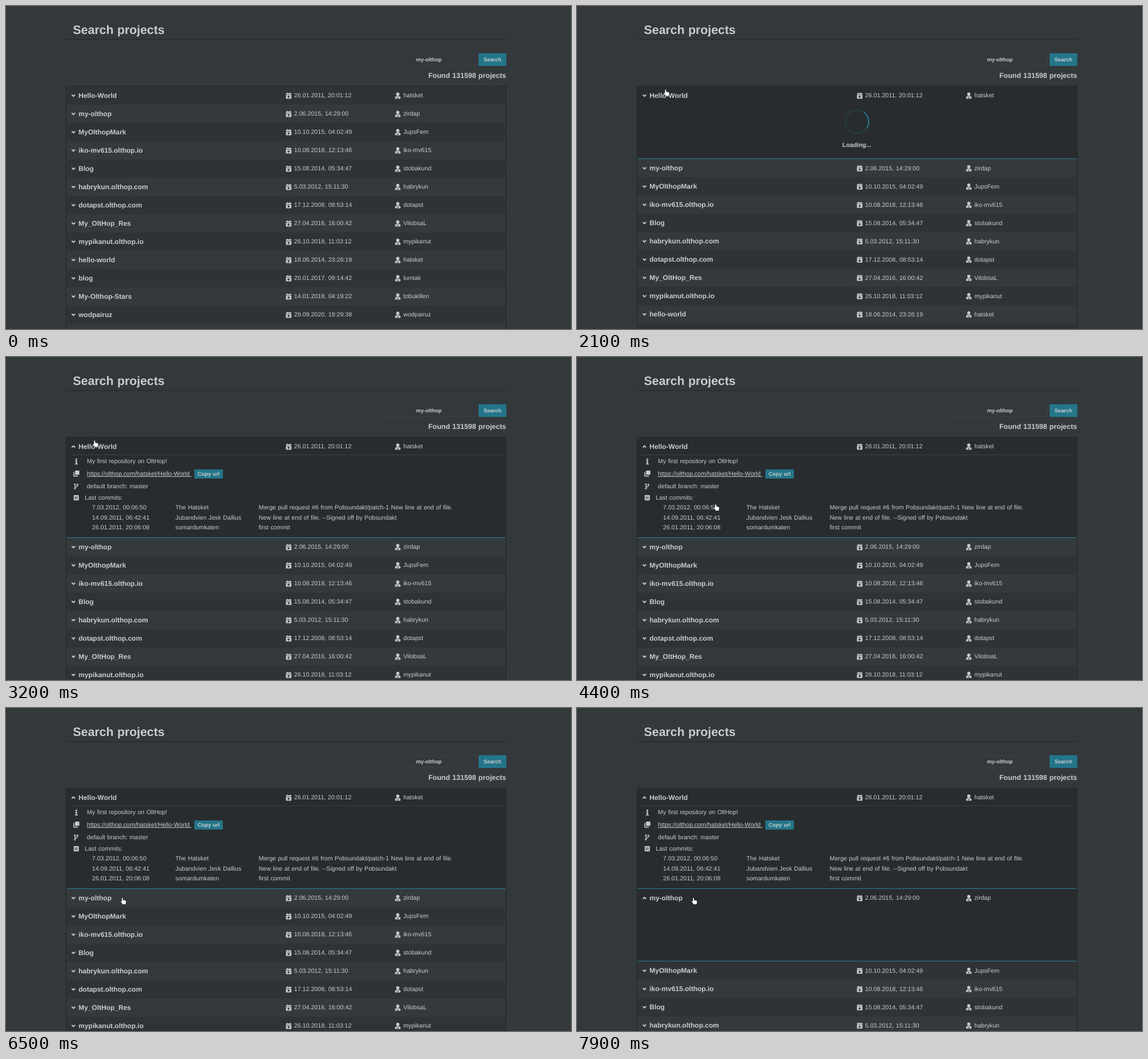
Recreate the animation shown at these times as an HTML page with a canvas. Size 990 by 566 pixels, loop 8 s.

```html
<!DOCTYPE html>
<html lang="en">
<head>
<meta charset="utf-8">
<title>Search projects</title>
<style>
html, body { margin: 0; width: 100%; height: 100%; overflow: hidden; background: #33383b; }
canvas { display: block; }
</style>
</head>
<body>
<canvas id="stage" width="990" height="566"></canvas>
<script>
const ctx = document.getElementById('stage').getContext('2d');
const LOOP = 8000, STEP = 100;
const FAMILY = '"Liberation Sans", Arial, sans-serif';
const C = {
  page: '#33383b', odd: '#2f3336', even: '#34393c', open: '#282c2e',
  edge: '#272b2d', text: '#c9cccd', teal: '#24758a', rule: '#3c4245', field: '#3a3f43'
};

// name | created | owner
const projects = `Hello-World|26.01.2011, 20:01:12|hatsket
my-olthop|2.06.2015, 14:29:00|zirdap
MyOlthopMark|10.10.2015, 04:02:49|JupsFem
iko-mv615.olthop.io|10.08.2018, 12:13:46|iko-mv615
Blog|15.08.2014, 05:34:47|stobakund
habrykun.olthop.com|5.03.2012, 15:11:30|habrykun
dotapst.olthop.com|17.12.2008, 08:53:14|dotapst
My_OltHop_Res|27.04.2016, 16:00:42|VilobsaL
mypikanut.olthop.io|26.10.2018, 11:03:12|mypikanut
hello-world|18.06.2014, 23:26:19|hatsket
blog|20.01.2017, 09:14:42|lumiak
My-Olthop-Stars|14.01.2018, 04:19:22|tobukillen
wodpairuz|29.09.2020, 19:29:38|wodpairuz
||`.split('\n').map(line => line.split('|'));

const commits = [
  ['7.03.2012, 00:06:50', 'The Hatsket', 'Merge pull request #6 from Pobsundakt/patch-1 New line at end of file.'],
  ['14.09.2011, 06:42:41', 'Jubandvien Jesk Dallius', 'New line at end of file. --Signed off by Pobsundakt'],
  ['26.01.2011, 20:06:08', 'somardumkaten', 'first commit']
];

// pointer path: time, left, top
const path = [
  [900, 857, 40], [1100, 768, 157], [1200, 768, 157], [1400, 182.8, 195],
  [1500, 152, 89], [1700, 152, 146], [3700, 152, 146], [3900, 342.5, 280.5],
  [4000, 342.5, 280.5], [4100, 342, 304.5], [4200, 342, 304.5], [4400, 239.6, 257.7],
  [4500, 239.6, 257.7], [4700, 120, 275], [4800, 330, 308], [4900, 552, 285],
  [5000, 552, 285], [5200, 803, 141], [5500, 108, 230], [5700, 180, 312],
  [5900, 221, 324], [6100, 219, 382], [6300, 203, 348], [6500, 200.8, 332.5]
];

const openFirst = 1800, fadeFirst = 2700, detailAt = 3200;
const openSecond = 6700, fadeSecond = 7415, fadeTime = 500;

const clamp = v => Math.max(0, Math.min(1, v));

function text(s, x, y, size = 10.667, bold = false, align = 'left') {
  ctx.font = `${bold ? 'bold ' : ''}${size}px ${FAMILY}`;
  ctx.textAlign = align;
  ctx.fillStyle = C.text;
  ctx.fillText(s, x, y + size * 0.3465);
}

function rect(x, y, w, h, color, r = 0) {
  ctx.fillStyle = color;
  ctx.beginPath();
  ctx.roundRect(x, y, w, h, r);
  ctx.fill();
}

function line(points, color, width) {
  ctx.strokeStyle = color;
  ctx.lineWidth = width;
  ctx.beginPath();
  points.forEach(([x, y]) => ctx.lineTo(x, y));
  ctx.stroke();
}

function disc(x, y, r, color = C.text) {
  ctx.fillStyle = color;
  ctx.beginPath();
  ctx.arc(x, y, r, 0, 7);
  ctx.fill();
}

function at(x, y, draw) {
  ctx.save();
  ctx.translate(x, y);
  draw();
  ctx.restore();
}

function chevron(y, up) {
  const d = up ? -1.6 : 1.6;
  line([[115.3, y - d], [118.2, y + d * 0.8], [121.1, y - d]], C.text, 1.9);
}

function calendar(bg) {
  rect(1.9, 0, 1.4, 2.5, C.text, 0.4);
  rect(6.3, 0, 1.4, 2.5, C.text, 0.4);
  rect(0, 1.4, 9.6, 2.1, C.text, [1, 1, 0, 0]);
  rect(0, 4.1, 9.6, 6.8, C.text, [0, 0, 1, 1]);
  rect(2.6, 6.8, 4.4, 1.4, bg);
  rect(4.1, 5.3, 1.4, 4.4, bg);
}

function person(bg) {
  disc(4.8, 2.8, 2.8);
  ctx.fill(new Path2D('M0 10V9Q.2 6.3 2.8 5.9H6.8Q9.4 6.3 9.6 9V10Q9.6 10.9 8.6 10.9H1Q0 10.9 0 10Z'));
  line([[3, 6.6], [4, 10.4], [4.5, 8]], bg, 0.5);
  line([[6.6, 6.6], [5.6, 10.4], [5.1, 8]], bg, 0.5);
}

function infoIcon() {
  disc(3, 1.5, 1.5);
  rect(1, 4, 3.2, 1.5, C.text);
  rect(2.1, 4, 2.1, 6, C.text);
  rect(0.6, 9, 5, 1.6, C.text);
}

function copyIcon() {
  rect(3, 0, 7.5, 7.6, C.text, 0.9);
  line([[0.8, 2.6], [0.8, 9.7], [8, 9.7]], C.text, 1.6);
}

function branchIcon() {
  line([[1.8, 2], [1.8, 9]], C.text, 1.3);
  line([[1.8, 6.6], [5.4, 5.8], [6.2, 3]], C.text, 1.3);
  for (const [x, y] of [[1.8, 1.8], [1.8, 9], [6.3, 2.4]]) {
    disc(x, y, 1.7);
    disc(x, y, 0.6, C.open);
  }
}

function commitIcon() {
  rect(0, 0, 9, 9.2, C.text, 1);
  rect(2, 2.2, 1.2, 4.8, C.open);
  for (let i = 0; i < 3; i++) rect(4.2, 2.2 + i * 1.8, 2.6, 0.9, C.open);
}

function loader(top, angle, alpha) {
  const x = 490.7, y = top + 61.8, a = angle * Math.PI / 180;
  ctx.save();
  ctx.globalAlpha = alpha;
  ctx.lineWidth = 2;
  ctx.strokeStyle = 'rgba(36,117,138,.25)';
  ctx.beginPath();
  ctx.arc(x, y, 20.5, 0, 7);
  ctx.stroke();
  ctx.strokeStyle = '#287d93';
  ctx.beginPath();
  ctx.arc(x, y, 20.5, a - Math.PI / 4, a + Math.PI / 4);
  ctx.stroke();
  text('Loading...', 490.2, top + 102, 10.667, true, 'center');
  ctx.restore();
}

function details(top) {
  rect(112, top + 30, 758, 1, C.rule);
  at(120.2, top + 36.7, infoIcon);
  text('My first repository on OltHop!', 141.8, top + 41.3);
  at(118, top + 58, copyIcon);
  text('https://olthop.com/hatsket/Hello-World', 141.8, top + 63.3);
  rect(141.8, top + 68, 183, 1, C.text);
  rect(330, top + 56, 50, 16, C.teal, 1);
  text('Copy url', 355, top + 63.6, 9.333, true, 'center');
  at(119, top + 80.4, branchIcon);
  text('default branch: master', 141.8, top + 85.3);
  at(118.6, top + 101, commitIcon);
  text('Last commits:', 138, top + 105.7);
  commits.forEach((row, i) => row.forEach((s, k) => text(s, 150.8 + k * 146, top + 122.6 + i * 17.35)));
}

function header() {
  text('Search projects', 117.3, 41.6, 21.333, true);
  rect(105, 58, 772, 1.2, C.edge);
  ctx.strokeStyle = C.field;
  ctx.lineWidth = 1;
  ctx.strokeRect(657.5, 83.5, 166, 21);
  text('my-olthop', 741, 94, 9.333, true, 'center');
  rect(828, 82.7, 48.7, 22.2, C.teal, 1);
  text('Search', 852.3, 94, 9.333, true, 'center');
  text('Found 131598 projects', 876.3, 121.7, 12.48, true, 'right');
}

function panel(i, t) {
  if (i === 0 && t >= openFirst) {
    return {
      detail: t >= detailAt, up: t >= fadeFirst,
      angle: -10 + 0.45 * (t - 2100), alpha: 1 - clamp((t - fadeFirst) / fadeTime)
    };
  }
  if (i === 1 && t >= openSecond) {
    return {
      up: t >= fadeSecond,
      angle: 148 + 0.45 * (t - 7900), alpha: 1 - clamp((t - fadeSecond) / fadeTime)
    };
  }
  return null;
}

function list(t) {
  rect(104.7, 139.7, 772.2, 440, C.edge);
  let top = 141;
  projects.forEach(([name, date, owner], i) => {
    const p = panel(i, t);
    const h = !p ? 32 : p.detail ? 176 : 127.3;
    const bg = p ? C.open : i % 2 ? C.even : C.odd;
    rect(106, top, 769.6, h, bg);
    if (name) {
      chevron(top + 16, p && p.up);
      text(name, 127, top + 16, 12, true);
      at(490.5, top + 10.6, () => calendar(bg));
      text(date, 504.8, top + 15.8);
      at(681.7, top + 10.6, () => person(bg));
      text(owner, 696.2, top + 15.8);
    }
    if (p) {
      if (p.detail) details(top);
      else loader(top, p.angle, p.alpha);
      rect(106, Math.round(top + h - 1), 769.6, 1, '#2b7f96');
    }
    top += h;
  });
}

const hand = new Path2D('M2.3 1Q3.2-.3 4.1 1V4.6Q5 4 6 4.6Q7 4.3 7.6 5Q9 4.8 9.4 6V8Q9.2 10 8.4 11.5H3.6Q2.8 9.8.6 7.6Q-.2 6.2 1.2 6.1L2.3 7Z');
const arrow = new Path2D('M.5.5V10.6L2.9 8.4L4.5 12L6.2 11.2L4.6 7.8H7.8Z');

function pointer(t) {
  if (t < path[0][0]) return;
  let k = path.findIndex(p => p[0] > t);
  if (k < 0) k = path.length;
  const a = path[k - 1], b = path[k] || a;
  const u = b === a ? 0 : (t - a[0]) / (b[0] - a[0]);
  const x = a[1] + (b[1] - a[1]) * u, y = a[2] + (b[2] - a[2]) * u;
  at(x, y, () => {
    const shape = y < 139 ? arrow : hand;
    ctx.strokeStyle = '#16191a';
    ctx.lineWidth = 1;
    ctx.stroke(shape);
    ctx.fillStyle = '#fff';
    ctx.fill(shape);
  });
}

function draw(t) {
  rect(0, 0, 990, 566, C.page);
  header();
  list(t);
  pointer(t);
}

ctx.textRendering = 'geometricPrecision';
ctx.wordSpacing = '0.6px';
ctx.lineCap = 'butt';
ctx.lineJoin = 'round';
const start = performance.now();
function tick() {
  const t = (performance.now() - start) % LOOP;
  draw(Math.floor(t / STEP) * STEP);
  requestAnimationFrame(tick);
}
tick();
</script>
</body>
</html>
```
